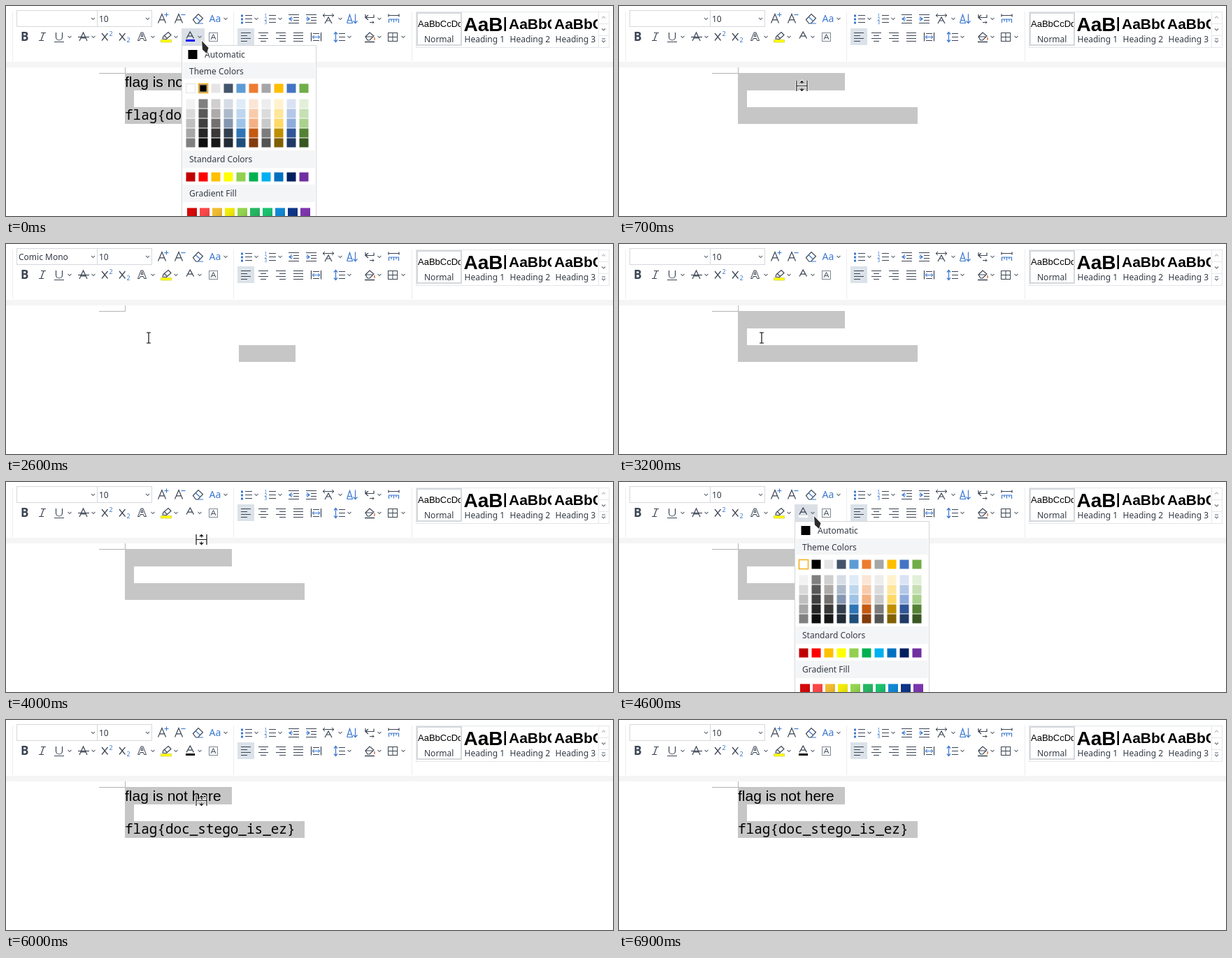
Animation, 868 px wide and 301 px high, one loop 7500 ms. Source, as an HTML page:

```html
<!DOCTYPE html>
<html lang="en">
<head>
<meta charset="utf-8">
<title>Revealing hidden text</title>
<style>
  html, body { margin: 0; width: 100%; height: 100%; overflow: hidden; background: #fff; }
  svg { display: block; width: 868px; height: 301px; }
  text { font-family: "Noto Sans", sans-serif; font-size: 12px; fill: #333a45; white-space: pre; }
  .sans { font-family: "Liberation Sans", Arial, sans-serif; fill: #000; }
  .mono { font-family: "Noto Sans Mono", monospace; font-weight: 500; fill: #000; }
</style>
</head>
<body>
<svg id="stage" viewBox="0 0 868 301"></svg>
<script>
const LOOP = 7500, DARK = '#3b4453', BLUE = '#3c78d0', SELECTED = '#c6c6c6';

const rect = (x, y, w, h, fill, extra = '') =>
  `<rect x="${x}" y="${y}" width="${w}" height="${h}" fill="${fill}" ${extra}/>`;
const frame = (x, y, w, h, stroke, width = 1) =>
  rect(x, y, w, h, 'none', `stroke="${stroke}" stroke-width="${width}"`);
const path = (d, stroke = DARK, width = 1.2, fill = 'none') =>
  `<path d="${d}" stroke="${stroke}" stroke-width="${width}" fill="${fill}"/>`;
const text = (x, y, s, extra = '') => `<text x="${x}" y="${y}" ${extra}>${s}</text>`;
const group = (id, content) => `<g id="${id}">${content}</g>`;
const sized = (size, fill = DARK) => `style="font-size:${size}px;fill:${fill}"`;
const caret = (x, y, color = '#6b7480') => path(`M${x - 2.5} ${y - 1}l2.5 2.5 2.5-2.5`, color, 1.1);
const letterA = (x, y, w, h) =>
  `M${x} ${y}l${w / 2} ${-h} ${w / 2} ${h}m${-w * .82} ${-h * .35}h${w * .64}`;
// Horizontal rules: [left, right] for each line, evenly spaced.
const rules = (spans, y, gap) => spans.map(([a, b], i) => `M${a} ${y + i * gap}H${b}`).join('');

function fontControls() {
  return frame(15.5, 6.5, 115, 23, '#d5d8dc') + frame(130.5, 6.5, 78, 23, '#d5d8dc') +
    caret(124.5, 18) + caret(202.5, 18) + text(133, 23, '10') +
    path(letterA(217.5, 24.5, 11, 13)) + path('M226.5 12.5h6M229.5 9.5v6', BLUE) +
    path(letterA(241.5, 24.5, 11, 13)) + path('M250.5 12.5h6', BLUE) +
    path('M267.5 19.5l7.5-8 6.5 6-7 7.5h-3z') + path('M271 15.5l6.5 6M274 25h8', BLUE) +
    text(290.5, 23, 'Aa', sized(14, BLUE)) + caret(314, 18);
}

function characterStyles() {
  const x = left => path(`M${left} 39l8.5 10.5M${left + 8.5} 39l-8.5 10.5`);
  return text(21, 50, 'B', 'font-weight="700" ' + sized(17)) +
    path('M50 38.5h7M47 49.5h7M54 38.5l-4 11') +
    path('M71.5 38v6.5a4.5 4.5 0 0 0 9 0V38M69 51.5h14') + caret(91, 44) +
    path(letterA(105, 50, 11, 12)) + path('M103 44.5h16') + caret(125, 44) +
    x(137) + text(147.5, 43, '2', sized(9, BLUE)) +
    x(162) + text(172.5, 52, '2', sized(9, BLUE)) +
    path('M188.5 49.5l4.5-11.5h3l4.5 11.5h-3l-1-3h-4.5l-1 3zM193 43.5l1.5-4 1.5 4z', DARK, 1) + caret(210, 44) +
    path('M224 47l1-3.5 7-6 4 4-6.5 6zM226 42l4.5 4.5') + rect(221.5, 48.5, 15, 3.5, '#ff0') +
    path('M221.5 48.5h15v3.5h-15z', '#b7b71d', .5) + caret(243, 44) +
    rect(251, 32, 33, 24, '#dae0e6', 'id="button"') +
    path(letterA(258, 46.5, 10.5, 9.5), DARK, 1.3) + rect(257, 48, 13, 3, '#fff', 'id="bar"') + caret(277, 44) +
    frame(290.5, 38.5, 12, 12, '#7f8792') + path(letterA(293, 48, 7, 7.5), DARK, 1);
}

function paragraphControls() {
  const dots = [13, 18, 23].map(y => rect(336, y - .5, 3, 3, BLUE)).join('');
  const digits = [1, 2, 3].map(n => text(369.5, 10.5 + n * 5, n, sized(6.5, BLUE))).join('');
  const align = (x, spans) => path(rules(spans.map(([a, b]) => [x + a, x + b]), 38.5, 4), DARK, 1.1);
  return dots + path(rules([[342, 352], [342, 352], [342, 352]], 13.5, 5)) + caret(358, 18) +
    digits + path(rules([[376, 386], [376, 386], [376, 386]], 13.5, 5)) + caret(392, 18) +
    path(rules([[404, 419], [411, 419], [411, 419], [404, 419]], 12.5, 4)) +
    path('M409 15.5l-4 3 4 3M405 18.5h5', BLUE) +
    path(rules([[429, 444], [436, 444], [436, 444], [429, 444]], 12.5, 4)) +
    path('M430 15.5l4 3-4 3M429 18.5h5', BLUE) +
    path('M456 25l5-9 5 9M458 21h6') + path('M453 13.5h16M456 11l-3 2.5 3 2.5M466 11l3 2.5-3 2.5', DARK, 1) + caret(478, 18) +
    path('M487.5 24.5l4-12 4 12M489 20.5h5M488 24.5h8', BLUE) + path('M499.5 11.5v13l-3-3M499.5 24.5l3-3', BLUE) +
    path('M514 12v4.5h12v-4M518 13l-4 3.5 4 3.5') + path('M520 23.5h6l-2-2m2 2l-2 2', DARK, 1) + caret(534, 18) +
    path('M547 13.5h15M547 11.5v4M562 11.5v4') + path('M547.5 24v-5h14v5M551 19.5v2.5M554.5 19.5v4M558 19.5v2.5', BLUE) +
    rect(331, 32, 24, 24, '#dbe2e9') +
    align(336, [[0, 14], [0, 9], [0, 14], [0, 9]]) + align(361, [[0, 14], [3, 11], [0, 14], [3, 11]]) +
    align(386, [[0, 14], [5, 14], [0, 14], [5, 14]]) + align(411, [[0, 14], [0, 14], [0, 14], [0, 14]]) +
    path('M436.500 38v12.500M450.500 38v12.500M439 39.500h9M439 49.500h9') +
    path('M438 44.500h11M441 42l-3 2.500 3 2.500M446 42l3 2.500-3 2.500', BLUE, 1) +
    path(rules([[476, 485], [476, 485], [476, 485]], 39.5, 5)) +
    path('M471.500 38v13M469 40.500l2.500-3 2.500 3M469 48.500l2.500 3 2.500-3', BLUE) + caret(491, 44) +
    path('M514 44l6-6 6 5-6 6h-3zM514 44h11') + path('M513 51.500h14', DARK, 1.5) +
    path('M527 45v4', '#d9733b', 1.5) + caret(534, 44) +
    frame(546.5, 38.5, 13, 12, DARK) + path('M553 39v11M547 44.500h12', DARK, 1) + caret(568, 44);
}

function styleGallery() {
  const clip = (id, right) => `<clipPath id="${id}">${rect(580, 10, right - 580, 36, '#000')}</clipPath>`;
  const sample = (x, y, s, size, id, weight) =>
    text(x, y, s, `class="sans" font-weight="${weight}" clip-path="url(#${id})" style="font-size:${size}px"`);
  return clip('c0', 650) + clip('c1', 715) + clip('c2', 780) + clip('c3', 846) +
    frame(586.5, 8.5, 276, 51, '#e4e6e9') + frame(588, 10, 63, 46, '#d5d8dc', 2) +
    sample(589, 30, 'AaBbCcDd', 13, 'c0', 400) + sample(654.5, 36, 'AaBb', 28, 'c1', 700) +
    sample(719, 33, 'AaBbCc', 21, 'c2', 700) + sample(784, 33, 'AaBbCc', 21, 'c3', 700) +
    text(598, 52, 'Normal') + [1, 2, 3].map(n => text(590.5 + n * 65, 52, 'Heading ' + n)).join('') +
    path('M847.500 9v50M848 25.500h14M848 42.500h14', '#e4e6e9', 1) +
    path('M852 17.500l2.500-2.500 2.500 2.500', '#b8bdc4', 1.1) + caret(854.5, 33.5) +
    path('M852 47h5', '#6b7480', 1.1) + caret(854.5, 50.5);
}

function colorMenu() {
  const theme = [[0, 0, 100], [0, 0, 0], [0, 2, 90], [215, 22, 34], [209, 59, 60],
    [24, 84, 56], [0, 0, 65], [45, 100, 50], [218, 52, 52], [96, 42, 48]];
  const shades = { 0: [-.05, -.15, -.25, -.35, -.5], 1: [.5, .35, .25, .15, .05], 2: [-.1, -.25, -.5, -.75, -.9] };
  const usual = [.8, .6, .4, -.25, -.5];
  const standard = 'c00000 ff0000 ffc000 ffff00 92d050 00b050 00b0f0 0070c0 002060 7030a0'.split(' ');
  const gradient = 'd80000 ff4343 f4bd2c f5ee00 92d64c 1fb75f 12c26d 0a86d6 062f86 7a30ae'.split(' ');
  const hsl = (h, s, l) => `hsl(${h},${s}%,${l}%)`;
  const shade = ([h, s, l], f) => hsl(h, s, f > 0 ? l + (100 - l) * f : l * (1 + f));
  const band = (y, h, label) => rect(253, y, 189, h, '#f4f5f7') + text(262, y + 16.500, label);

  let out = rect(251.5, 56.5, 192, 260, '#fff', 'stroke="#d3d6da"') +
    rect(254, 60, 186, 18, '#e8ebee', 'id="hover"') +
    rect(260.5, 63, 13, 13, '#000') + text(284, 74, 'Automatic') +
    band(81, 23, 'Theme Colors') + band(207, 25, 'Standard Colors') + band(256, 25, 'Gradient Fill');
  theme.forEach((color, i) => {
    const x = 257.5 + i * 18;
    out += rect(x, 111.5, 13, 13, hsl(...color), i ? '' : 'stroke="#e1e3e6"');
    (shades[i] || usual).forEach((f, row) => out += rect(x, 133.5 + row * 14, 13, 13, shade(color, f)));
    out += rect(x, 238.5, 13, 13, '#' + standard[i]);
    out += rect(x + 1.5, 289.5, 14, 14, '#' + gradient[i]) + rect(x + 1.5, 289.5, 14, 14, 'url(#sheen)');
  });
  const ring = (id, x) => group(id, frame(x, 111.500, 13, 13, '#f5b42b', 1.8) + frame(x + 1.4, 112.9, 10.2, 10.2, '#fff4d6', .8));
  return out + ring('whiteRing', 257.5) + ring('blackRing', 275.5);
}

const splitShape = 'M-7.500-7.500v15M7.500-7.500v15M-8 0H8M0-7v4M0 3v4M-2.500-4.500l2.500-2.500 2.500 2.500M-2.500 4.500l2.500 2.500 2.500-2.500';
const beamShape = 'M-3-7.500h2.500l.5 1 .5-1H3M0-6.500v13M-3 7.500h2.500l.5-1 .5 1H3';
const outlined = d => path(d, '#fff', 3.2) + path(d, '#111', 1.2);

const stage = document.getElementById('stage');
stage.innerHTML =
  `<defs><linearGradient id="sheen" x2="1" y2="1"><stop stop-color="#fff" stop-opacity="0"/>
   <stop offset="1" stop-color="#000" stop-opacity=".14"/></linearGradient></defs>` +
  rect(0, 0, 868, 301, '#fff') + rect(0, 80, 868, 8, '#f5f5f5') +
  path('M9.500 8v71M325.500 8v71M580.500 8v71', '#ebedef', 1) +
  fontControls() + text(18, 23, 'Comic Mono', 'id="fontName"') +
  characterStyles() + paragraphControls() + styleGallery() +
  group('allSelected', rect(170, 96, 153, 25, SELECTED) + rect(170, 121, 13, 24, SELECTED) + rect(170, 145, 257, 24, SELECTED)) +
  rect(333, 145, 81, 24, SELECTED, 'id="partSelected"') +
  path('M133 96.500h37.500V88', '#b4b4b4', 1) +
  group('content', text(170, 116, 'flag is not here', 'class="sans" style="font-size:21px"') +
    text(170, 163, 'flag{doc_stego_is_ez}', 'class="mono" style="font-size:19.33px"')) +
  group('menu', colorMenu()) +
  group('arrow', path('M0 0L9.500 10 7 18 1 12.500z', '#fff', 1.6) + path('M0 0L9.500 10 7 18 1 12.500z', 'none', 0, '#2b2b2b')) +
  group('split', outlined(splitShape)) + group('beam', outlined(beamShape));

// Pointer samples: time, shape, x, y.
const pointer = [
  [0, 'arrow', 280, 50], [100, 'arrow', 274, 72], [200, 'arrow', 266, 114], [500, 'arrow', 261, 113],
  [700, 'split', 261.500, 114.500], [1100, 'beam', 310, 152], [1200, 'beam', 365, 196], [1300, 'beam', 392, 219],
  [1900, 'beam', 420, 200], [2000, 'beam', 445, 172], [2100, 'beam', 457, 154], [2200, 'beam', 452, 177],
  [2400, 'beam', 400, 160], [2500, 'beam', 322, 148], [2600, 'beam', 204, 134.500],
  [3500, 'beam', 180, 142], [3600, 'beam', 138, 144], [3700, 'beam', 111, 140], [3800, 'beam', 152, 124],
  [3900, 'beam', 230, 101], [4000, 'split', 279.500, 82.500], [4100, 'arrow', 284, 71], [4200, 'arrow', 281, 62],
  [4400, 'arrow', 279, 49], [5100, 'arrow', 286, 65], [5200, 'arrow', 291.500, 81], [5300, 'arrow', 294, 97],
  [5400, 'arrow', 291, 107], [5500, 'arrow', 287, 113], [5600, 'arrow', 284, 115], [5700, 'arrow', 281, 115],
  [5800, 'arrow', 279, 115], [6000, 'split', 279.500, 115.500], [6200, 'split', 310, 140], [6300, 'beam', 330, 150],
  [6400, 'beam', 238, 116], [6500, 'arrow', 146, 56], [6600, 'arrow', 196, 8], [6800, 'arrow', 123, 1], [6900, 'none', 0, 0]
];
const parts = {};
stage.querySelectorAll('[id]').forEach(node => parts[node.id] = node);
const show = (id, visible) => parts[id].setAttribute('visibility', visible ? 'visible' : 'hidden');

function draw(t) {
  const during = (from, to) => t >= from && t < to;
  const [, shape, x, y] = pointer.findLast(sample => sample[0] <= t);
  for (const id of ['arrow', 'split', 'beam']) {
    show(id, id === shape);
    parts[id].setAttribute('transform', `translate(${x} ${y})`);
  }
  const menuOpen = during(0, 700) || during(4500, 6000);
  parts.menu.setAttribute('display', menuOpen ? 'inline' : 'none');
  show('hover', during(100, 200) || during(5100, 5300));
  show('whiteRing', during(500, 700) || during(4500, 6000));
  show('blackRing', t < 700 || during(5500, 6000));
  show('button', menuOpen || during(4400, 4500));
  parts.bar.setAttribute('fill', t < 700 ? '#00f' : t < 6000 ? '#fff' : '#000');

  show('content', !during(700, 6000));
  show('fontName', during(1500, 3200));
  show('allSelected', !during(1500, 3200));
  show('partSelected', during(2400, 3200));
  const left = t < 2500 ? 391 : 333;
  parts.partSelected.setAttribute('x', left);
  parts.partSelected.setAttribute('width', 414 - left);
}

const start = performance.now();
function tick() {
  draw((performance.now() - start) % LOOP);
  requestAnimationFrame(tick);
}
tick();
</script>
</body>
</html>
```
